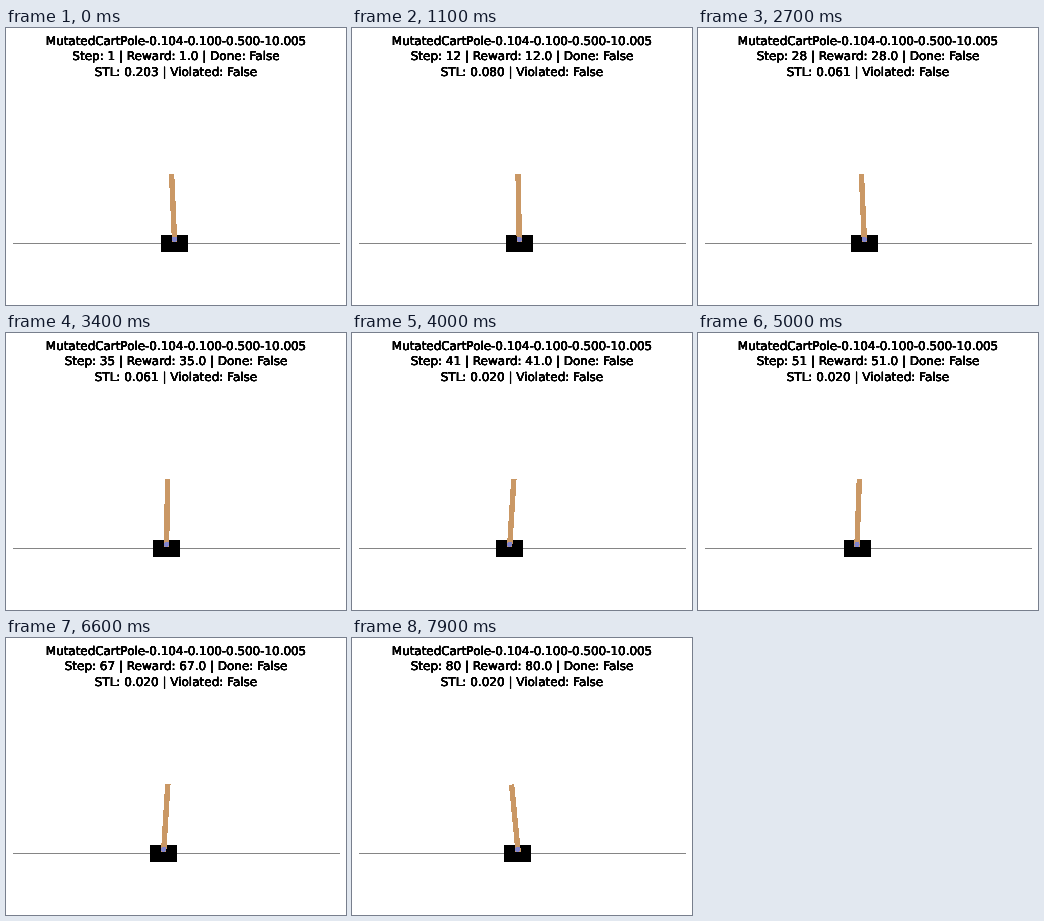
These frames come from a looping animation (340x277 px, 8000 ms). An HTML page:

```html
<!DOCTYPE html>
<html lang="en">
<head>
<meta charset="utf-8">
<title>Cart pole</title>
<style>
  html, body { margin: 0; width: 100%; height: 100%; overflow: hidden; background: #fff; }
  svg { position: absolute; left: 0; top: 0; shape-rendering: crispEdges; }
  p {
    position: absolute; left: 0; width: 340px; margin: 0;
    font: 12px/16px "DejaVu Sans", sans-serif;
    text-align: center; white-space: pre; color: #000;
    text-rendering: geometricPrecision;
    -webkit-text-stroke: .2px #000;
    text-shadow: 0 0 0 #000, 0 0 0 #000, 0 0 0 #000, 0 0 0 #000, 0 0 0 #000;
  }
  #title { top: 5px; letter-spacing: -.05px; }
  #status { top: 20px; }
  #stl { top: 36px; }
</style>
</head>
<body>
<svg width="340" height="277" viewBox="0 0 340 277">
  <path d="M7 215.5H334" stroke="#858585"/>
  <g id="cart">
    <rect x="-13.5" y="207" width="27" height="17"/>
    <rect id="pole" x="-2.7" y="146.2" width="5.4" height="67.8" fill="#ca9865"/>
    <circle cy="211.3" r="2.6" fill="#8184cb"/>
  </g>
</svg>
<p id="title">MutatedCartPole-0.104-0.100-0.500-10.005</p>
<p id="status"></p>
<p id="stl"></p>
<script>
const LOOP = 8000, STEP = 100;
const [cart, pole, statusLine, stlLine] =
  ["cart", "pole", "status", "stl"].map(id => document.getElementById(id));

// 0 before step a, 1 after step b
const ramp = (s, a, b) => Math.min(1, Math.max(0, (s - a) / (b - a)));
const ease = (s, a, b) => {
  const u = ramp(s, a, b);
  return u * u * (3 - 2 * u);
};

function draw(step) {
  // The balancing sway moves the cart one way and tips the pole the other.
  const sway = Math.cos((step - 54) / 26 * 2 * Math.PI);
  const x = 167.8 + 0.7 * sway - 9.3 * (ease(step, 22, 41) - ease(step, 67, 87));
  const angle = -1.7 - 0.85 * sway + 4.4 * ease(step, 28, 41) - 7.4 * ease(step, 67, 80);
  const stl = 0.203 - 0.123 * ramp(step, 1, 8)
    - 0.019 * ramp(step, 20, 22) - 0.041 * ramp(step, 35, 38);

  cart.setAttribute("transform", `translate(${x.toFixed(2)})`);
  pole.setAttribute("transform", `rotate(${angle.toFixed(2)} 0 211.3)`);
  statusLine.textContent = `Step: ${step} | Reward: ${step.toFixed(1)} | Done: False`;
  stlLine.textContent = `STL: ${stl.toFixed(3)} | Violated: False`;
}

const start = performance.now();
let shown = 0;
function tick() {
  const time = (performance.now() - start) % LOOP;
  const step = Math.floor(time / STEP) + 1;
  if (step !== shown) draw(shown = step);
  requestAnimationFrame(tick);
}
tick();
</script>
</body>
</html>
```
